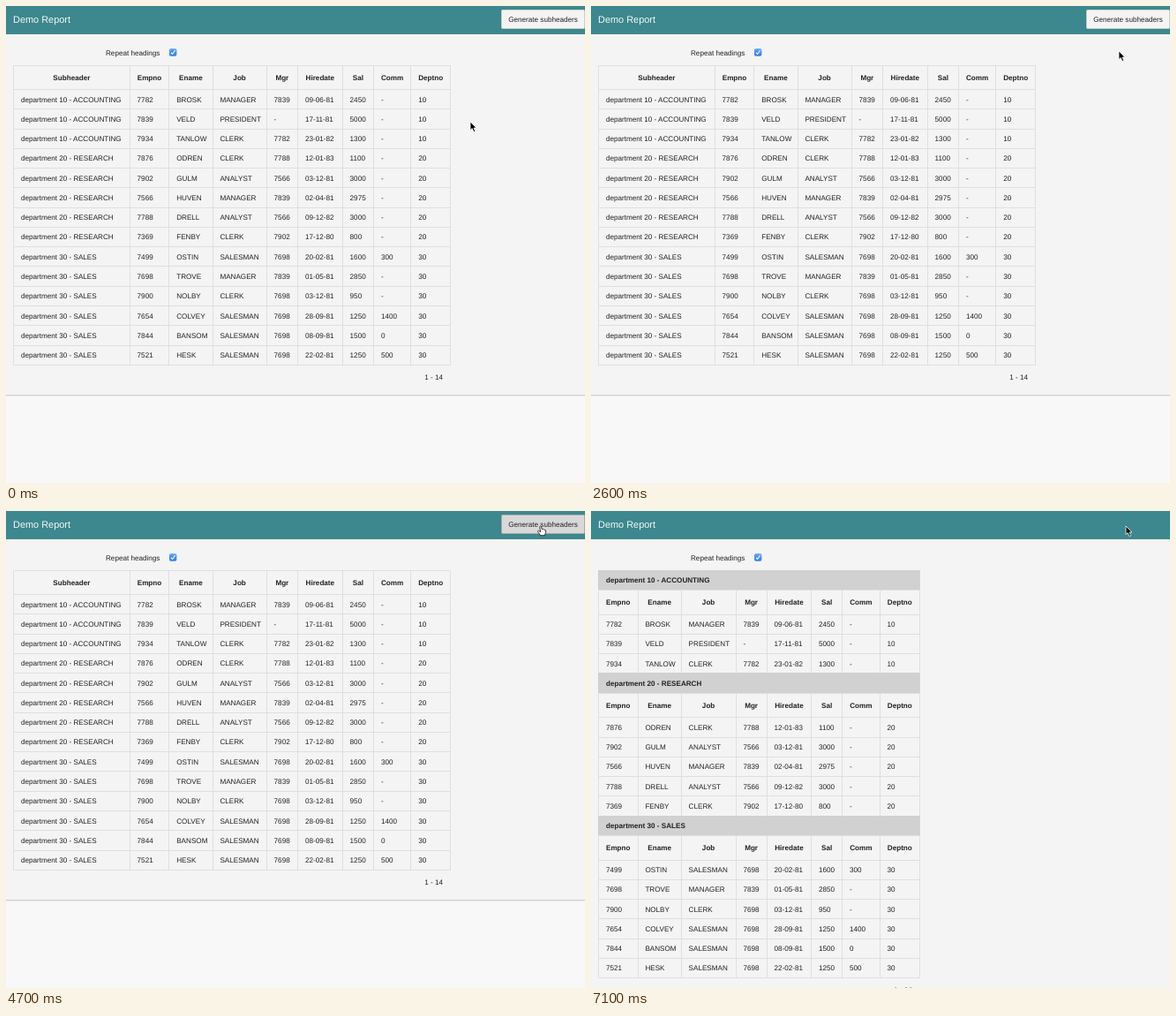
Animation of 656 by 540 pixels, one loop 7.2 s. Source, as an HTML page:

```html
<!DOCTYPE html>
<html lang="en">
<head>
<meta charset="utf-8">
<title>Demo Report</title>
<style>
  html, body { margin: 0; width: 100%; height: 100%; overflow: hidden; background: #f8f8f8; }
  svg { display: block; }
  text { font: 8.14px "Liberation Sans", Arial, sans-serif; fill: #222; text-rendering: geometricPrecision; }
  .bold { font-weight: bold; }
  .mid { text-anchor: middle; }
  .end { text-anchor: end; }
  .title { font-size: 10.95px; fill: #f4f9f9; }
  .rule { stroke: #dfdfdf; }
</style>
</head>
<body>
<svg width="656" height="540" viewBox="0 0 656 540">
  <defs>
    <linearGradient id="tick" x2="0" y2="1">
      <stop stop-color="#62a6f6"/><stop offset="1" stop-color="#2f7de8"/>
    </linearGradient>
  </defs>
  <rect id="panel" y="31" width="656" height="409" fill="#f4f4f4"/>
  <g id="edge">
    <rect y="440" width="656" height="1" fill="#cfcfcf"/>
    <rect y="441" width="656" height="1" fill="#ececec"/>
  </g>
  <rect width="656" height="32" fill="#3d878e"/>
  <text class="title" x="8" y="19.2">Demo Report</text>
  <text x="113" y="56">Repeat headings</text>
  <rect x="185" y="48.3" width="8.4" height="8.4" rx="1.8" fill="url(#tick)"/>
  <path d="M187 52.8l1.6 1.7 3-4.2" fill="none" stroke="#fff" stroke-width="1.1"/>
  <g id="flat"></g>
  <g id="grouped"></g>
  <g id="button">
    <rect id="face" x="561.5" y="4.5" width="94" height="21" rx="1"/>
    <text class="mid" x="608.5" y="18">Generate subheaders</text>
  </g>
  <g id="cursor">
    <path id="arrow" d="M0 0V9.6L2.2 7.6L3.9 11.6L5.7 10.8L4 7H7Z" fill="#000" stroke="#fff" stroke-width=".8"/>
    <path id="hand" d="M-1.3 .6Q-.7-.7 .4 .5L1.2 3.6Q2.2 2.8 2.8 4Q3.8 3.3 4.3 4.5Q5.6 4.2 5.6 6Q5.7 8 4.7 9.2V10.7H-.5Q-1.3 8.8-3.5 6.6Q-3.7 5.1-2.2 5.5L-.4 6.8Z"
      fill="#fff" stroke="#111" stroke-width=".8" stroke-linejoin="round"/>
  </g>
</svg>
<script>
const $ = id => document.getElementById(id);
const HEADS = "Empno Ename Job Mgr Hiredate Sal Comm Deptno".split(" ");
const DEPTS = [
  ["ACCOUNTING", `7782 BROSK MANAGER 7839 09-06-81 2450 -
7839 VELD PRESIDENT - 17-11-81 5000 -
7934 TANLOW CLERK 7782 23-01-82 1300 -`],
  ["RESEARCH", `7876 ODREN CLERK 7788 12-01-83 1100 -
7902 GULM ANALYST 7566 03-12-81 3000 -
7566 HUVEN MANAGER 7839 02-04-81 2975 -
7788 DRELL ANALYST 7566 09-12-82 3000 -
7369 FENBY CLERK 7902 17-12-80 800 -`],
  ["SALES", `7499 OSTIN SALESMAN 7698 20-02-81 1600 300
7698 TROVE MANAGER 7839 01-05-81 2850 -
7900 NOLBY CLERK 7698 03-12-81 950 -
7654 COLVEY SALESMAN 7698 28-09-81 1250 1400
7844 BANSOM SALESMAN 7698 08-09-81 1500 0
7521 HESK SALESMAN 7698 22-02-81 1250 500`]
].map(([name, rows], i) => {
  const no = 10 * (i + 1);
  return { title: `department ${no} - ${name}`, rows: rows.split("\n").map(r => [...r.split(" "), no]) };
});
const TOP = 67.2, BAND = 22.6, HEAD = 27.3, ROW = 22.27;

const snap = v => Math.floor(v) + .5;
const text = (x, y, s, cls = "") => `<text class="${cls}" x="${x}" y="${y + 2.9}">${s}</text>`;

// Builds a table row by row; cols holds the vertical rules.
function table(cols) {
  const left = cols[0], right = cols[cols.length - 1];
  let y = TOP, out = "";
  const rule = () => `<path class="rule" d="M${left} ${snap(y)}H${right}"/>`;
  const line = (h, draw) => {
    out += draw(y + h / 2) + rule();
    out += cols.map(x => `<path class="rule" d="M${snap(x)} ${snap(y)}V${snap(y + h)}"/>`).join("");
    y += h;
  };
  return {
    head: names => line(HEAD, c => names.map((s, i) => text((cols[i] + cols[i + 1]) / 2, c, s, "bold mid")).join("")),
    row: cells => line(ROW, c => cells.map((s, i) => text(cols[i] + 8.4, c, s)).join("")),
    band(s) {
      const top = snap(y) - .5;
      out += `<rect x="${left - .5}" y="${top}" width="${right - left + 1}" height="${snap(y + BAND) - .5 - top}" fill="#d1d1d1"/>`
        + text(17, y + 10.8, s, "bold");
      y += BAND;
    },
    done: () => out + rule() + text(right - 8.5, y + 13.6, "1 - 14", "end")
  };
}

const flat = table([8.5, 140.2, 184.8, 234, 295.2, 330.5, 381.2, 416.5, 458.8, 503.6]);
flat.head(["Subheader", ...HEADS]);
for (const d of DEPTS) for (const r of d.rows) flat.row([d.title, ...r]);
$("flat").innerHTML = flat.done();

const grouped = table([8.5, 53, 102.2, 164, 199.2, 249.6, 284.6, 327.2, 372.4]);
for (const d of DEPTS) {
  grouped.band(d.title);
  grouped.head(HEADS);
  d.rows.forEach(grouped.row);
}
$("grouped").innerHTML = grouped.done();

// Pointer stops: time, x, y, easing on the way there
const smooth = u => u * u * (3 - 2 * u), easeOut = u => u * (2 - u), linear = u => u;
const STOPS = [
  [0, 526, 131, linear], [1400, 557, 103, smooth], [1900, 557, 103, linear],
  [2600, 598, 51, linear], [3500, 606, 17, easeOut], [7200, 606, 17, linear]
];
function pointer(t) {
  const i = STOPS.findIndex(s => s[0] > t);
  const [t0, x0, y0] = STOPS[i - 1], [t1, x1, y1, ease] = STOPS[i];
  const u = ease((t - t0) / (t1 - t0));
  return [x0 + (x1 - x0) * u, y0 + (y1 - y0) * u];
}

const show = (id, on) => $(id).setAttribute("display", on ? "inline" : "none");

function draw(now) {
  const t = Math.floor(now % 7200 / 100) * 100;
  const [x, y] = pointer(t);
  const after = t >= 4800, over = !after && y < 25, down = over && t >= 4500;
  show("flat", !after);
  show("button", !after);
  show("edge", !after);
  show("grouped", after);
  show("hand", over);
  show("arrow", !over);
  $("panel").setAttribute("height", after ? 509 : 409);
  $("face").setAttribute("fill", down ? "#d8d8d8" : over ? "#fff" : "#f4f4f4");
  $("face").setAttribute("stroke", down ? "#a9a9a9" : "#c9cccc");
  $("cursor").setAttribute("transform", `translate(${x} ${y})`);
}

const start = performance.now();
function tick() {
  draw(performance.now() - start);
  requestAnimationFrame(tick);
}
tick();
</script>
</body>
</html>
```
